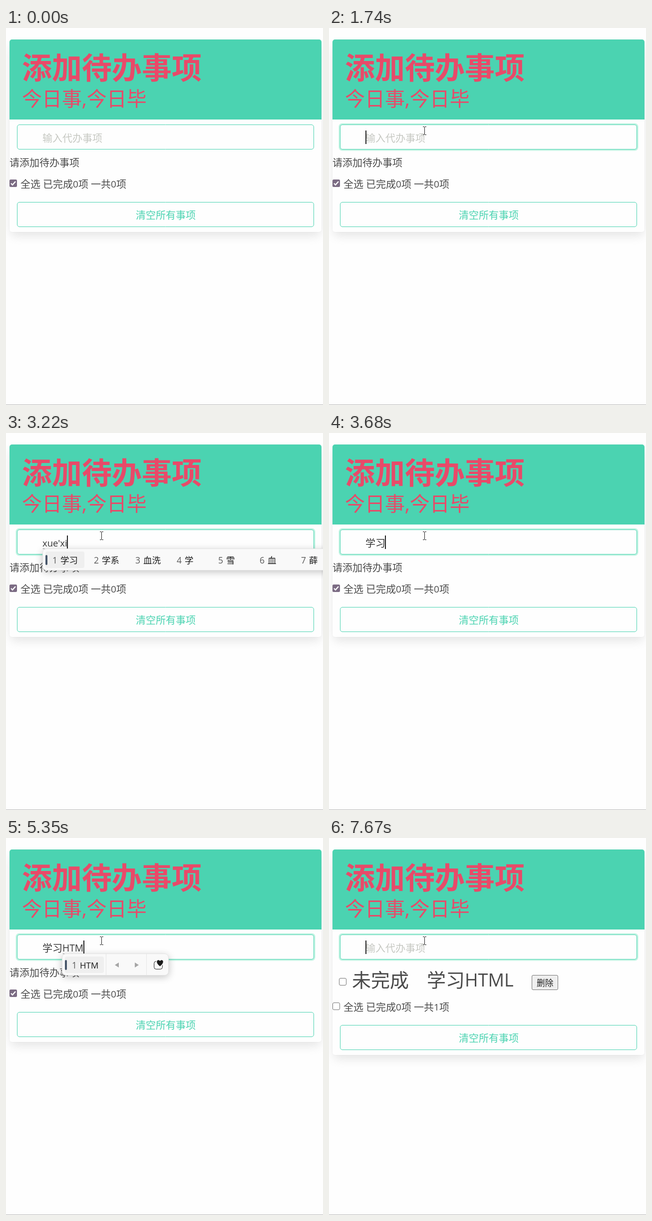
Write an HTML page with a canvas that moves like this. It is 635 by 754 pixels and loops after 8 s.

```html
<!DOCTYPE html>
<html lang="zh-CN">
<head>
<meta charset="utf-8">
<title>待办事项</title>
<style>
html, body { margin: 0; width: 100%; height: 100%; overflow: hidden; background: #fefefe; }
canvas { display: block; }
</style>
</head>
<body>
<canvas id="stage" width="635" height="754"></canvas>
<script>
const ctx = document.getElementById('stage').getContext('2d');
const LOOP = 8000;
const TEAL = '#4bd3b1', RED = '#e84a69', INK = '#4a4a4a';
const FAMILY = '"Open Sans", "Noto Sans CJK SC", "Noto Sans CJK", "Noto Sans", sans-serif';

// Each entry holds until the next one starts.
const STATES = [
  { at: 0 },
  { at: 680, focus: true, caret: 73 },
  { at: 1210, focus: true },
  { at: 1740, focus: true, caret: 73 },
  { at: 2270, focus: true, typing: 'x', caret: 82, words: '下 先 想 小 向 行 像' },
  { at: 2550, focus: true, typing: 'xu', caret: 93, words: '需 许 徐 须 续 序 虚' },
  { at: 2750, focus: true, typing: 'xue', caret: 103, words: '学 雪 血 薛 穴 靴 削' },
  { at: 3080, focus: true, typing: "xue'x", caret: 117, words: '学校 学习 血型 学 雪 血 学下' },
  { at: 3220, focus: true, typing: "xue'xi", caret: 122, words: '学习 学系 血洗 学 雪 血 薛' },
  { at: 3680, focus: true, done: '学习', caret: 112 },
  { at: 4210, focus: true, done: '学习' },
  { at: 4600, focus: true, done: '学习', typing: 'H', caret: 127, words: 'H' },
  { at: 4930, focus: true, done: '学习', typing: 'HT', caret: 138, words: 'HT HTML HTTP' },
  { at: 5350, focus: true, done: '学习', typing: 'HTM', caret: 155, words: 'HTM' },
  { at: 5550, focus: true, done: '学习', typing: 'HTML', caret: 164, words: 'HTML' },
  { at: 6080, focus: true, done: '学习', typing: 'HTML', words: 'HTML' },
  { at: 6610, focus: true, done: '学习', latin: 'HTML', caret: 164 },
  { at: 6870, focus: true, added: true, caret: 73 },
  { at: 7140, focus: true, added: true },
  { at: 7670, focus: true, added: true, caret: 73 }
];

function text(str, x, y, size, color, weight = 400) {
  ctx.font = `${weight} ${size}px ${FAMILY}`;
  ctx.fillStyle = color;
  ctx.fillText(str, x, y);
}

function box(x, y, w, h, r, fill, stroke) {
  ctx.beginPath();
  ctx.roundRect(x, y, w, h, r);
  if (fill) { ctx.fillStyle = fill; ctx.fill(); }
  if (stroke) { ctx.strokeStyle = stroke; ctx.lineWidth = 1; ctx.stroke(); }
}

function shadowBox(x, y, w, h, r, fill, blur, dy, alpha) {
  ctx.save();
  ctx.shadowColor = `rgba(10,10,10,${alpha})`;
  ctx.shadowBlur = blur;
  ctx.shadowOffsetY = dy;
  box(x, y, w, h, r, fill);
  ctx.restore();
}

function polygon(points, fill, stroke) {
  ctx.beginPath();
  points.forEach(([x, y]) => ctx.lineTo(x, y));
  ctx.closePath();
  ctx.fillStyle = fill;
  ctx.fill();
  if (stroke) { ctx.strokeStyle = stroke; ctx.lineWidth = 1; ctx.stroke(); }
}

function checkbox(x, y, checked) {
  if (!checked) return box(x + .5, y + .5, 14, 14, 2.5, '#fff', '#767676');
  box(x, y, 15, 15, 2.5, '#7c6c84');
  ctx.beginPath();
  ctx.moveTo(x + 3, y + 7.8);
  ctx.lineTo(x + 6, y + 10.8);
  ctx.lineTo(x + 12, y + 4);
  ctx.strokeStyle = '#fff';
  ctx.lineWidth = 2.2;
  ctx.stroke();
}

function card(added) {
  const dy = added ? 26 : 0;
  shadowBox(9.5, 25.5, 620, 380 + dy, 5, '#fff', 20, 10, .1);
  box(6, 22, 627, 387 + dy, 6, 'rgba(10,10,10,.02)');
  box(7, 23, 625, 385 + dy, 5, '#fefefe');
  box(7, 23, 625, 160, [5, 5, 0, 0], TEAL);
  text('添加待办事项', 32, 102, 60, RED, 700);
  text('今日事,今日毕'.replace(',', ','), 32, 156, 40, RED);

  if (added) {
    checkbox(20, 280, false);
    text('未完成', 46, 298, 38, INK);
    text('学习', 196, 298, 38, INK);
    text('HTML', 272, 297, 36, INK);
    box(406.5, 274.5, 52, 29, 2.5, '#efefef', '#767676');
    text('删除', 416, 296, 16.7, '#222');
  } else {
    text('请添加待办事项', 7, 276.5, 20, INK);
  }

  const base = 319.5 + dy;
  checkbox(7, 303 + dy, !added);
  text('全选', 29, base, 20, INK);
  text('已完成', 74, base, 20, INK);
  text('0', 134, base - .5, 19, INK);
  text('项', 145, base, 20, INK);
  text('一共', 170, base, 20, INK);
  text(added ? '1' : '0', 210, base - .5, 19, INK);
  text('项', 221, base, 20, INK);

  box(22.5, 348.5 + dy, 594, 49, 4.5, null, TEAL);
  text('清空所有事项', 260, 381.5 + dy, 20, TEAL);
}

function inputField(s) {
  if (s.focus) box(19.5, 190.5, 600, 55, 7, 'rgba(0,209,140,.25)');
  box(22.5, 193.5, 594, 49, 4.5, '#fefefe', TEAL);
  const { done = '', typing = '', latin = '' } = s;
  if (!done && !typing) text('输入代办事项', 73, 227.5, 20, '#c6c8c2');
  const left = done ? 113 : 73;
  text(done, 73, 227.5, 20, '#363636');
  text(typing || latin, left, 227, done ? 19.2 : 18.5, '#363636');
  if (typing) {
    const width = ctx.measureText(typing).width;
    for (let x = left + 1; x < left + width; x += 2) ctx.fillRect(x, 231, 1, 1);
  }
  if (s.caret) {
    ctx.fillStyle = '#222';
    ctx.fillRect(s.caret, 205, 2, 27);
  }
}

function heartIcon(x, y) {
  box(x + .7, y + 1.7, 16.6, 15.6, 4, null, '#222');
  ctx.beginPath();
  ctx.moveTo(x + 12.5, y + 11.5);
  ctx.bezierCurveTo(x + 1, y + 3, x + 8, y - 4, x + 12.5, y + 1);
  ctx.bezierCurveTo(x + 17, y - 4, x + 24, y + 3, x + 12.5, y + 11.5);
  ctx.strokeStyle = '#f9f9f9';
  ctx.lineWidth = 3;
  ctx.stroke();
  ctx.fillStyle = '#1a1a1a';
  ctx.fill();
}

function candidates(words, left) {
  const list = words.split(' ');
  const extra = words === 'HTML' ? 13 : 0;
  const divider = left + 88 + extra + 83 * (list.length - 1);
  shadowBox(left, 231, divider + 126 - left, 43, 8, '#f9f9f9', 15, 4, .24);
  box(left + .5, 231.5, divider + 125 - left, 43, 7.5, '#f9f9f9', '#e3e3e3');
  box(left + 6, 237, 78 + extra, 33, 4, '#efefef');
  box(left + 6, 244, 4, 20, 2, '#48566a');
  list.forEach((word, i) => {
    const x = left + 20 + 83 * i;
    text(String(i + 1), x, 261, 17.5, '#5c5c5c');
    text(word, x + 16, 261, /[A-Z]/.test(word) ? 17 : 17.5, '#1a1a1a');
  });
  ctx.fillStyle = '#e6e6e6';
  ctx.fillRect(divider, 232, 1, 42);
  ctx.fillRect(divider + 81, 232, 1, 42);
  polygon([[divider + 18, 254], [divider + 26, 249], [divider + 26, 259]], '#a6a6a6');
  polygon([[divider + 66, 254], [divider + 58, 249], [divider + 58, 259]], '#a6a6a6');
  heartIcon(divider + 96, 245);
}

function arrowPointer(x, y) {
  const shape = [[0, 0], [0, 16], [4, 12.5], [6.5, 18], [9, 17], [6.5, 11.5], [11.5, 11.5]];
  polygon(shape.map(([px, py]) => [x + px + .5, y + py + .5]), '#fff', '#111');
}

function textPointer(x, y) {
  ctx.fillStyle = '#222';
  ctx.fillRect(x, y - 7, 1, 15);
  for (const row of [y - 8, y + 8]) {
    ctx.fillRect(x - 3, row, 3, 1);
    ctx.fillRect(x + 1, row, 3, 1);
  }
}

function pointer(t) {
  if (t < 70) return;
  const step = Math.min(7, Math.floor((t - 70) / (470 / 7) + 1e-6));
  const rest = 1 - step / 7;
  const x = Math.round(191 + 387 * rest ** 1.6);
  const y = Math.round(205 + 537 * rest ** 1.18);
  if (t >= 680 && t < 810) {
    ctx.beginPath();
    ctx.arc(189, 204, 15, 0, 2 * Math.PI);
    ctx.fillStyle = 'rgba(255,255,0,.52)';
    ctx.fill();
  }
  if (y < 243) textPointer(x, y);
  else arrowPointer(x, y);
}

function draw(t) {
  const s = STATES.findLast(state => state.at <= t);
  ctx.fillStyle = '#fefefe';
  ctx.fillRect(0, 0, 635, 754);
  card(s.added);
  inputField(s);
  if (s.words) candidates(s.words, s.done ? 112 : 73);
  ctx.fillStyle = '#b9b9b9';
  ctx.fillRect(0, 753, 635, 1);
  pointer(t);
}

const start = performance.now();
function tick() {
  draw((performance.now() - start) % LOOP);
  requestAnimationFrame(tick);
}
tick();
</script>
</body>
</html>
```
